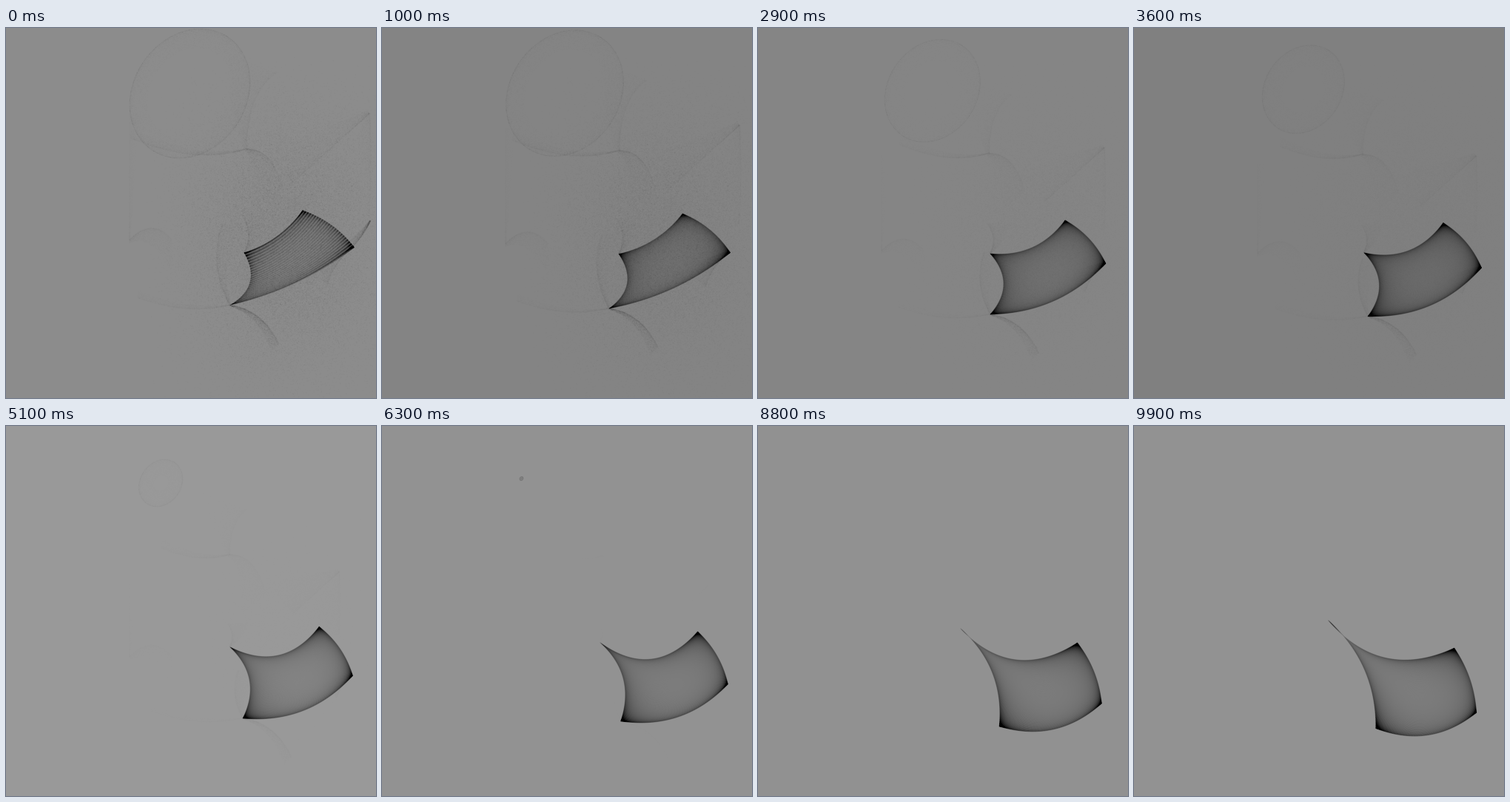
Write an HTML page with a canvas that moves like this. It is 500 px wide and 500 px high and loops after 10000 ms.

```html
<!DOCTYPE html>
<html>
<head>
<meta charset="utf-8">
<style>
html, body { margin: 0; width: 100%; height: 100%; overflow: hidden; background: #8c8c8c }
canvas { display: block; width: 500px; height: 500px }
</style>
</head>
<body>
<canvas width="500" height="500"></canvas>
<script>
const S = 500, LOOP = 10000, STEP = 100, END = 6.6;
const ctx = document.querySelector('canvas').getContext('2d');
const img = ctx.createImageData(S, S);
const ink = new Float32Array(S * S);

let seed;
function rand() {
  seed = (seed * 1664525 + 1013904223) >>> 0;
  return seed / 4294967296;
}
const bell = () => (rand() + rand() + rand()) / 1.5 - 1;
const mix = (a, b, k) => a + (b - a) * k;
const bend = (a, c, b, k) => mix(mix(a, c, k), mix(c, b, k), k);
const clamp = k => Math.min(1, Math.max(0, k));
const smooth = k => (k = clamp(k)) * k * (3 - 2 * k);
const shift = (p, x, y) => [p[0] + x, p[1] + y];

// background grey at [second, level]
const greys = [[0, 140], [1, 132], [2, 140], [3.6, 128], [5.1, 153], [6.7, 144], [10, 146]];
function greyAt(t) {
  const i = greys.findIndex(g => g[0] > t);
  const [[t0, a], [t1, b]] = [greys[i - 1], greys[i]];
  return mix(a, b, (t - t0) / (t1 - t0));
}

// parabola through the places at 0, 5 and 10 s
const glide = (t, a, b, c) => a.map((v, i) =>
  v * (t - 5) * (t - 10) / 50 + b[i] * t * (10 - t) / 25 + c[i] * t * (t - 5) / 50);

function corners(t) {
  return {
    A: glide(t, [321, 303], [302, 298], [260, 260]),
    B: glide(t, [400, 246], [422, 270], [432, 300]),
    C: glide(t, [470, 296], [468, 336], [462, 388]),
    D: glide(t, [302, 374], [319, 394], [326, 408])
  };
}

// adds ink shared between the four nearest pixels
function dot(x, y, w) {
  const i = Math.floor(x), j = Math.floor(y), fx = x - i, fy = y - j;
  if (i < 0 || j < 0 || i > S - 2 || j > S - 2) return;
  const n = j * S + i;
  ink[n] += w * (1 - fx) * (1 - fy);
  ink[n + 1] += w * fx * (1 - fy);
  ink[n + S] += w * (1 - fx) * fy;
  ink[n + S + 1] += w * fx * fy;
}

// curved edge whose control point stands off the chord by sag
function edge(p, q, sag) {
  const dx = q[0] - p[0], dy = q[1] - p[1], l = Math.hypot(dx, dy);
  const c = [(p[0] + q[0]) / 2 - dy / l * sag, (p[1] + q[1]) / 2 + dx / l * sag];
  return k => [bend(p[0], c[0], q[0], k), bend(p[1], c[1], q[1], k)];
}

const shade = k => .5 / Math.sqrt(k * (1 - k) + .02);

function drawSheet(t, { A, B, C, D }) {
  const top = edge(A, B, 16 + 50 * smooth(t / 8)), bottom = edge(D, C, 20 + 20 * smooth(t / 4));
  const left = edge(A, D, -36), right = edge(B, C, -13);
  const cols = 320, rows = 220, ruled = .5 * clamp(1 - t / .8);
  const tone = 20 + 4 * clamp(t / 5);
  let above = [];
  for (let j = 0; j <= rows; j++) {
    const v = j / rows, l = left(v), r = right(v), row = [];
    const lines = 1 + ruled * Math.sin(v * 150);
    for (let i = 0; i <= cols; i++) {
      const u = i / cols, a = top(u), b = bottom(u);
      const p = row[i] = [0, 1].map(n => mix(a[n], b[n], v) + mix(l[n], r[n], u)
        - mix(mix(A[n], B[n], u), mix(D[n], C[n], u), v));
      if (!i || !j) continue;
      const w = row[i - 1], h = above[i];
      const area = Math.abs((p[0] - w[0]) * (p[1] - h[1]) - (p[1] - w[1]) * (p[0] - h[0]));
      dot(p[0], p[1], tone * area * shade(u) * shade(v) * lines);
    }
    above = row;
  }
}

// veil fanning out from an anchor: one crisp side, the other fading out
function veil(at, cx, cy, ex, ey, wide, weight, scale = 1) {
  const l = Math.hypot(ex, ey);
  for (let i = 0; i < 3000; i++) {
    const s = rand(), r = wide * rand() ** 2 * (.1 + s);
    dot(at[0] + scale * bend(0, cx, ex, s) - ey / l * r + bell(),
        at[1] + scale * bend(0, cy, ey, s) + ex / l * r + bell(), weight);
  }
}

function drawVeils(t, { A, C, D }, fade) {
  const small = 1 - .08 * t;
  const knot = [325 - 4.5 * t, 163 + 2 * t];
  const rim = [166, 286 + 5 * t];
  const peak = [491 - 8 * t, 115 + 16 * t];
  veil(D, 44, 6, 66, 52, 14, 2.4 * fade);
  veil(D, -30, -55, -10, -110, 25, 1.3 * fade, small);
  veil(D, -60, 14, -125, -10, 10, .6 * fade);
  veil(A, 14, -25, -4, -52, 25, .8 * fade, small);
  veil(knot, -70, 22, -158, -15, 12, 1.2 * fade, small);
  veil(knot, 35, 0, 48, 52, 40, 1.1 * fade);
  veil(knot, 0, -75, 40, -103, -60, 1.1 * fade, small);
  veil(rim, 32, -32, 58, 0, 40, .7 * fade);
  veil(rim, 0, -80, 0, -170, 12, .4 * fade, small);
  veil(peak, -50, 45, -106, 95, 50, 1.8 * fade, small);
  veil(peak, 4, 80, -1, 145, 60, 1.1 * fade, small);
  veil(C, -25, 15, -36, 50, 25, 1.2 * fade, small);
  // flick at the right, gone within a second
  veil(shift(C, 22, -36), -8, 18, -26, 38, 10, 1.6 * clamp(1 - t));
}

// fuzzy loop that shrinks and rises
function drawRing(t, fade) {
  const k = clamp(1 - (t / 6.4) ** 2), x0 = mix(186, 248, k), y0 = mix(70, 88, k);
  for (let i = 0; i < 9000; i++) {
    const a = rand() * 2 * Math.PI, r = 1 - rand() ** 3 * mix(.9, .3, k);
    const x = 76 * k * r * Math.cos(a), y = 92 * k * r * Math.sin(a);
    dot(x0 + x * .83 - y * .56, y0 + x * .56 + y * .83, 1.6 * fade);
  }
}

function draw(t) {
  const quad = corners(t), fade = clamp(1 - t / END);
  seed = 7;
  ink.fill(0);
  drawSheet(t, quad);
  if (fade) {
    drawVeils(t, quad, fade);
    drawRing(t, fade);
    for (let i = 0; i < 60000; i++) dot(375 + 190 * bell(), 285 + 250 * bell(), 4 * fade * fade);
  }
  const grey = greyAt(t);
  for (let i = 0, j = 0; i < ink.length; i++, j += 4) {
    img.data[j] = img.data[j + 1] = img.data[j + 2] = grey - ink[i];
    img.data[j + 3] = 255;
  }
  ctx.putImageData(img, 0, 0);
}

const start = performance.now();
let last = -1;
function tick() {
  const n = Math.floor((performance.now() - start) % LOOP / STEP);
  if (n !== last) draw((last = n) * STEP / 1000);
  requestAnimationFrame(tick);
}
tick();
</script>
</body>
</html>
```
